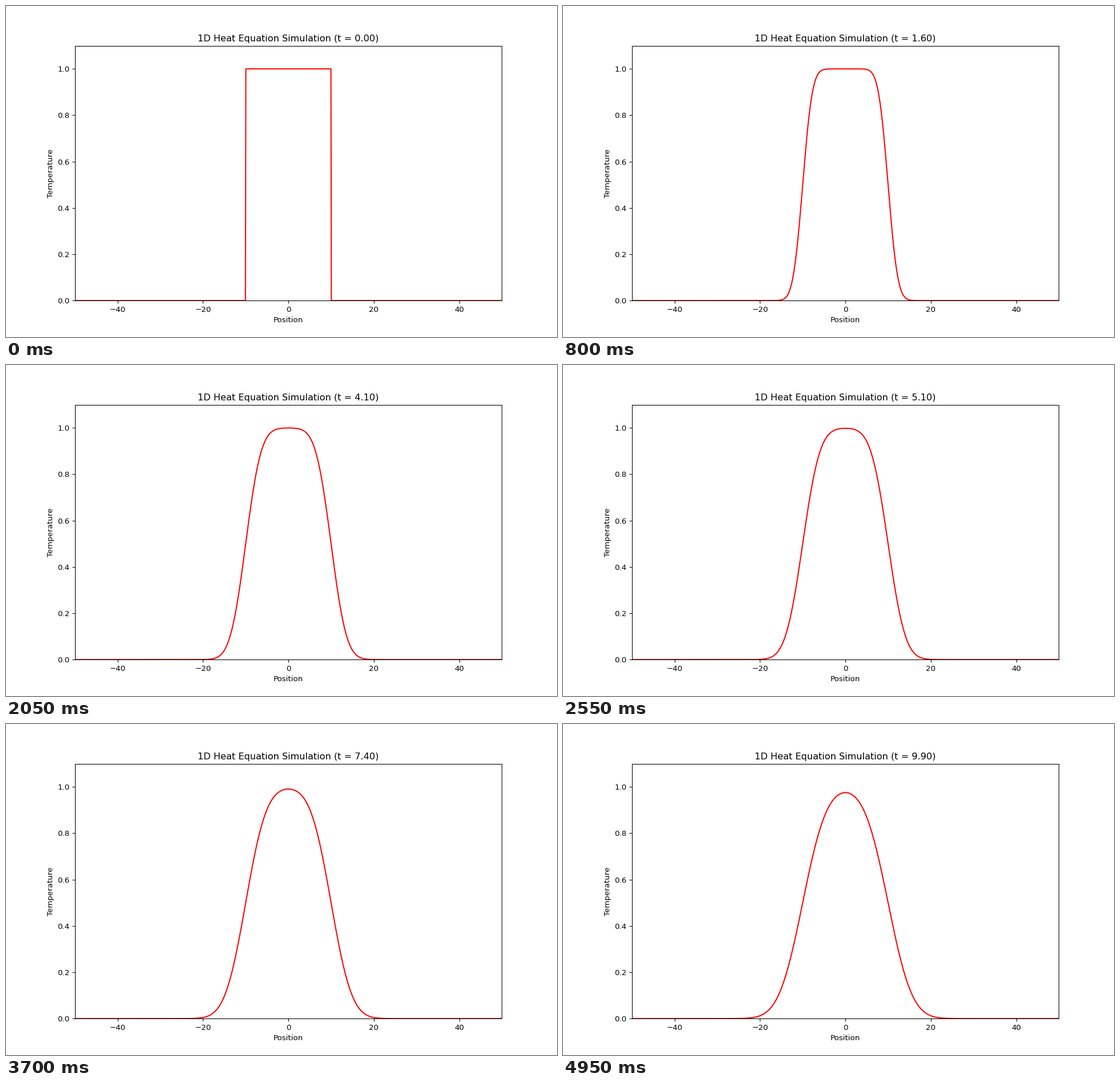
Animation of 966x580 px, one loop 5 s. Source, as a matplotlib script:

```python
import math

import matplotlib.pyplot as plt
import numpy as np
from matplotlib.animation import FuncAnimation

WIDTH, HEIGHT = 966, 580
DPI = 96.6
FRAMES = 100
INTERVAL = 50          # ms
DT = 0.1               # simulated time per frame
DIFFUSIVITY = 1.0
HALF_WIDTH = 10.0

x = np.linspace(-50, 50, 1000)
erf = np.vectorize(math.erf)


def temperature(t):
    """Exact solution for a hot block spreading along an infinite rod."""
    if t == 0:
        return np.where(np.abs(x) < HALF_WIDTH, 1.0, 0.0)
    spread = math.sqrt(4 * DIFFUSIVITY * t)
    return (erf((x + HALF_WIDTH) / spread) - erf((x - HALF_WIDTH) / spread)) / 2


# The tiny margin keeps float rounding from losing a pixel.
size = ((WIDTH + 0.001) / DPI, (HEIGHT + 0.001) / DPI)
fig, ax = plt.subplots(figsize=size, dpi=DPI)
line, = ax.plot(x, temperature(0), color="red", linewidth=1.5)
ax.set_xlim(-50, 50)
ax.set_ylim(0, 1.1)
ax.set_xlabel("Position")
ax.set_ylabel("Temperature")
title = ax.set_title("")


def update(frame):
    t = frame * DT
    line.set_ydata(temperature(t))
    title.set_text(f"1D Heat Equation Simulation (t = {t:.2f})")
    return line, title


anim = FuncAnimation(fig, update, frames=FRAMES, interval=INTERVAL,
                     repeat=True, repeat_delay=0, blit=False)
plt.show()
```
